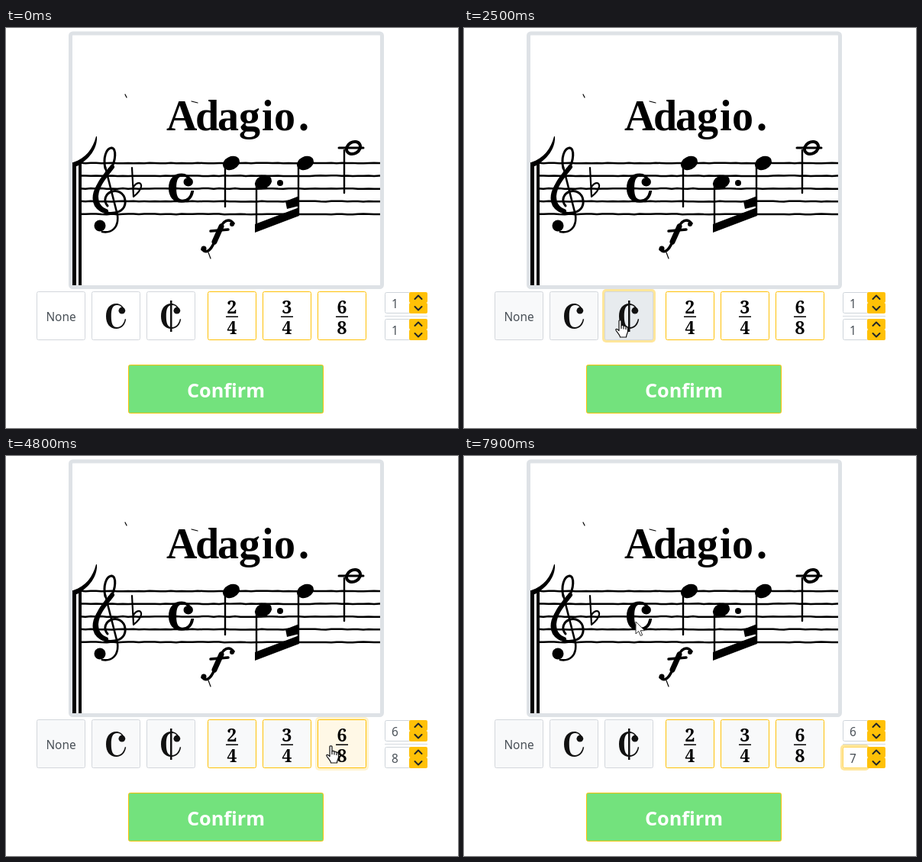
Animation of 592 by 524 pixels, one loop 8 s. Source, as an HTML page:

```html
<!DOCTYPE html>
<html lang="en">
<head>
<meta charset="utf-8">
<title>Time signature picker</title>
<style>
  html, body { margin: 0; width: 100%; height: 100%; overflow: hidden; background: #fff; }
  svg { display: block; width: 592px; height: 524px; }
  .ui { font: 15.4px "Noto Sans", "Open Sans", sans-serif; fill: #495057; }
  .go { font: 700 25.3px "Noto Sans", "Open Sans", sans-serif; fill: #fff; }
  .title { font: 700 56px "Liberation Serif", serif; }
  .digit { font: 900 23px "Noto Serif", serif; }
  .mid { text-anchor: middle; }
  .line { fill: none; stroke: #000; stroke-linecap: round; stroke-linejoin: round; }
  .chev { fill: none; stroke: #212529; stroke-width: 2; stroke-linecap: round; stroke-linejoin: round; }
</style>
</head>
<body>
<svg viewBox="0 0 592 524">
  <defs>
    <g id="common">
      <path d="M25 8C22 2 18 0 14 0C5 0 0 7 0 17C0 27 5 34 14 34C21 34 26 29 27 21H25.5C24 28 20 32 15 32C9 32 7 27 7 17C7 7 9 2 15 2C18 2 20 3 21 5Z"/>
      <circle cx="21.5" cy="9.500" r="4.500"/>
    </g>
  </defs>

  <rect x="84.500" y="7" width="408" height="332.500" rx="3" fill="#fff" stroke="#dee2e6" stroke-width="5"/>
  <text class="title" x="210 248 277 305 335 351 383" y="134">Adagio.</text>
  <path d="M119 142C120 158 109 172 93 181H88V176C104 171 114 158 118 142Z"/>
  <path d="M87 176H92V337H87ZM95 178H99V337H95Z"/>
  <g class="line" id="ink">
    <path stroke-width="3" d="M130 184C127 170 131 158 138 157C145 157 144 174 137 185C126 200 115 208 115 223C115 238 130 244 142 242C152 241 157 234 156 226C155 216 146 212 139 214C130 217 127 226 133 233"/>
    <path stroke-width="6" d="M139 182C128 196 119 206 118 220C118 230 122 237 131 240"/>
    <path stroke-width="2.600" d="M130 182L146 245C148 262 138 269 126 267"/>
    <path stroke-width="2.200" d="M165 183L167 221C172 217 176 213 177 208C178 202 172 201 167 208"/>
    <path stroke-width="2.400" d="M287 179V234M328 204V264M383 179V244M443 160V216"/>
    <path stroke-width="3" d="M436 157H468"/>
    <ellipse stroke-width="4" cx="455" cy="157" rx="9.500" ry="7.500" transform="rotate(-30 455 157)"/>
    <path stroke-width="3.500" d="M298 256C292 248 284 253 281 262L273 280C268 292 262 296 257 290M268 266L291 264"/>
    <path stroke-width="7" d="M282 260L273 280"/>
    <path stroke-width="1.200" d="M156 87L158 91M243 96L251 98M265 294L268 302"/>
  </g>
  <g id="dots"></g>
  <use href="#common" transform="translate(214 191.500) scale(1.150 1.070)" stroke="#000" stroke-width="1.800"/>
  <path d="M326 257L384 235V246L326 268ZM366 227L384 220V233L368 237Z"/>

  <g id="plain"></g>
  <g id="timed"></g>

  <rect x="160.500" y="441.500" width="255" height="63" rx="2" fill="#73e27d" stroke="#ffc107"/>
  <text class="go mid" x="288" y="484">Confirm</text>

  <path id="arrow" fill="#fff" stroke="#333" d="M0 0V16L3.700 12.500L6.300 18.500L8.700 17.500L6.200 11.700H11.500Z"/>
  <g id="hand"><g transform="translate(-6 0)" stroke="#111" stroke-width="1.200" stroke-linejoin="round">
    <path fill="#fff" d="M5 1.500C5 .5 8 .5 8 1.500V8C8 7 11 7 11 8.500C11 8 14 8 14 9.500C14 9 16.500 9 16.500 11V15C16.500 18 14.500 19 14.500 23H6.500C6.500 20 1 15 .8 13.500C.6 12 2.500 11.500 5 14.500Z"/>
    <path fill="none" d="M8 8V12M11 8.500V12.500M14 9.500V13"/>
  </g></g>
</svg>
<script>
const LOOP = 8000, STEP = 100;
const $ = id => document.getElementById(id);

function add(parent, tag, attrs, text) {
  const el = document.createElementNS("http://www.w3.org/2000/svg", tag);
  for (const k in attrs) el.setAttribute(k, attrs[k]);
  if (text) el.textContent = text;
  return parent.appendChild(el);
}
const box = (parent, x, y, w, h, more) =>
  add(parent, "rect", { x, y, width: w, height: h, ...more });
const glowBox = (parent, x, y, w, h) =>
  box(parent, x - 3, y - 3, w + 6, h + 6, { rx: 5, fill: "#ffc107" });

let seed = 7;
const rand = () => (seed = seed * 16807 % 2147483647) / 2147483647;

// Worn staff lines
for (let i = 0; i < 5; i++) {
  let d = "";
  for (let x = 97; x < 490; x += 7)
    d += `${d ? "L" : "M"}${x} ${177 + 16.7 * i + rand() * .8 - .4}`;
  add($("ink"), "path", { d: d + "H490", "stroke-width": 2.5, "stroke-linecap": "butt" });
}
// Note heads, then round dots
for (const [x, y] of [[295, 177], [337, 202], [392, 177]])
  add($("dots"), "ellipse", { cx: x, cy: y, rx: 11.5, ry: 8.5, transform: `rotate(-25 ${x} ${y})` });
for (const [cx, cy, r] of [[359, 203, 4], [123, 259, 7.5], [296, 257, 3], [259, 289, 3.5]])
  add($("dots"), "circle", { cx, cy, r });

const buttons = ["None", "C", "cut", [2, 4], [3, 4], [6, 8]].map((label, i) => {
  const timed = Array.isArray(label), x = 40 + 72 * i + (timed ? 8 : 0), mid = x + 32;
  const g = add(timed ? $("timed") : $("plain"), "g", {});
  const glow = glowBox(g, x, 345, 64, 64);
  const face = box(g, x + .5, 345.5, 63, 63, { rx: 2 });
  if (timed) {
    label.forEach((d, n) => add(g, "text", { x: mid, y: 374 + 26.5 * n, class: "digit mid" }, d));
    box(g, x + 24, 377.5, 16, 1.5);
  } else if (label === "None") {
    add(g, "text", { x: mid, y: 384, class: "ui mid" }, label);
  } else {
    add(g, "use", { href: "#common", fill: "#111", transform: `translate(${x + 19} 361) scale(.97)` });
    if (label === "cut") box(g, x + 31, 357, 2.5, 41, { fill: "#111" });
  }
  return { x, y: 345, w: 64, h: 64, label, timed, glow, face };
});

const fields = [346, 381].map(y => {
  const g = add($("timed"), "g", {});
  const glow = glowBox(g, 496, y, 32, 28);
  const face = box(g, 496.5, y + .5, 33, 27, { rx: 2, fill: "#fff" });
  const text = add(g, "text", { x: 505, y: y + 21, class: "ui" });
  const caret = box(g, 514, y + 5, 1, 20, { fill: "#222" });
  const halves = [0, 14].map(dy =>
    ({ x: 528, y: y + dy, w: 24, h: 14.5, el: box(g, 528, y + dy, 24, 14, { rx: 2 }) }));
  add(g, "path", { class: "chev", d: `M535.5 ${y + 9}l4.5 -4.5l4.5 4.5m-9 10l4.5 4.5l4.5 -4.5` });
  return { glow, face, text, caret, halves };
});
box($("timed"), 496, 377, 56, 1, { fill: "#d5dae0" });

// Pointer moves: start, end, x, y, power that bends y
const ENTER = [561, 107];
const moves = [
  [300, 715, 62, 384, .45], [1100, 1300, 160, 380], [1700, 1900, 204, 382],
  [2500, 2900, 300, 381], [3200, 3500, 577, 372], [3500, 3600, 544, 374],
  [3600, 3900, 375, 381], [4200, 4500, 425, 379], [4900, 5200, 579, 374],
  [5200, 5400, 541, 350], [5800, 5900, 541, 363], [6100, 6200, 541, 402],
  [6400, 6500, 543, 388], [6700, 6900, 579, 374], [6900, 7400, 225, 217, 2]
];
const CIRCLING = 7400;

// Clicks: time, control (buttons, then fields), step for a field
const clicks = [
  [1300, 1], [2000, 2], [2300, 2], [3200, 3], [4100, 4], [4800, 5],
  [5500, 6, 1], [6000, 6, -1], [6300, 7, -1], [6400, 7, -1], [6500, 7, 1]
];

function pointer(t) {
  if (t < moves[0][0]) return null;
  if (t >= CIRCLING) {
    const a = (t - CIRCLING) / 500 * 2 * Math.PI;
    return [Math.round(225 - 14 * Math.sin(a)), Math.round(204 + 13 * Math.cos(a))];
  }
  let [x, y] = ENTER;
  for (const [from, to, tx, ty, bend = 1] of moves) {
    if (t < from) break;
    const k = Math.min(1, (t - from) / (to - from));
    x += (tx - x) * k;
    y += (ty - y) * k ** bend;
  }
  return [Math.round(x), Math.round(y)];
}

function stateAt(t) {
  const s = { active: -1, since: 0, picked: -1, values: [1, 1], used: new Set() };
  for (const [time, id, step] of clicks) {
    if (time > t) break;
    if (id !== s.active) s.since = time;
    s.active = id;
    s.used.add(id);
    if (step) s.values[id - 6] += step;
    else if (buttons[id].timed) s.values = [...buttons[id].label];
    else s.picked = s.picked === id ? -1 : id;
  }
  return s;
}

function draw(t) {
  const at = pointer(t), s = stateAt(t);
  const age = t - s.since, shine = age < STEP ? .2 : .4;
  let hot = false;
  const over = r => {
    const hit = !!at && at[0] >= r.x && at[0] <= r.x + r.w && at[1] >= r.y && at[1] <= r.y + r.h;
    hot = hot || hit;
    return hit;
  };

  buttons.forEach((b, i) => {
    const hover = over(b), picked = s.picked === i;
    const touched = b.timed ? s.used.has(i) : t >= 700;
    const rest = touched ? "#f8f9fa" : "#fff";
    const fill = picked ? "#e9bc43" : !hover ? rest : b.timed ? "#fff8e6" : "#e7ebee";
    b.face.setAttribute("fill", fill);
    b.face.setAttribute("stroke", picked ? "#dba92a" : b.timed ? "#ffc107" : "#d3d7dc");
    b.glow.setAttribute("opacity", s.active === i ? shine : 0);
  });

  fields.forEach((f, i) => {
    const on = s.active === 6 + i;
    f.text.textContent = s.values[i];
    f.glow.setAttribute("opacity", on ? shine : 0);
    f.face.setAttribute("stroke", on ? "#ffd75e" : "#ced4da");
    f.caret.setAttribute("opacity", on && age < 500 ? 1 : 0);
    for (const h of f.halves) h.el.setAttribute("fill", over(h) ? "#e8ad08" : "#ffc107");
  });

  $("timed").setAttribute("opacity", t >= 1400 && t < 2400 ? .65 : 1);
  for (const id of ["arrow", "hand"]) {
    $(id).setAttribute("visibility", at && (id === "hand") === hot ? "visible" : "hidden");
    if (at) $(id).setAttribute("transform", `translate(${at})`);
  }
}

const start = performance.now();
function tick() {
  const t = (performance.now() - start) % LOOP;
  draw(Math.floor(t / STEP) * STEP);
  requestAnimationFrame(tick);
}
tick();
</script>
</body>
</html>
```
